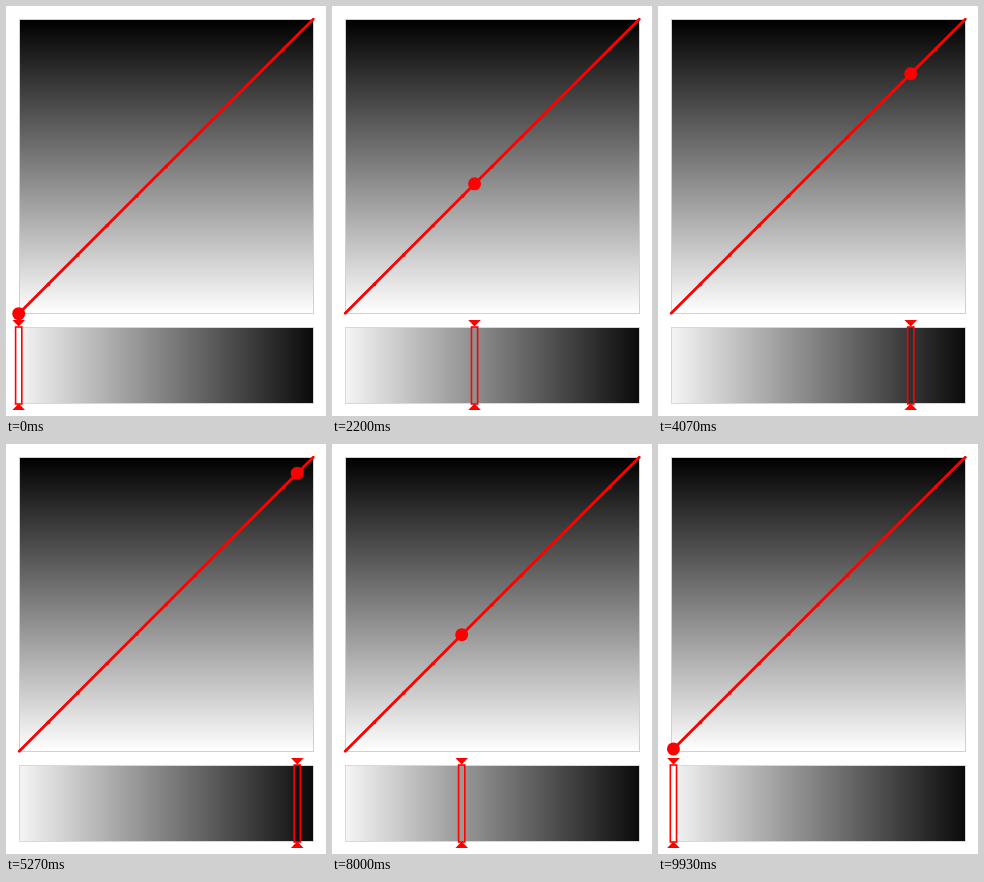
Recreate the animation shown at these times as an HTML page. Size 320x410 px, loop 9.99 s.

```html
<!DOCTYPE html>
<html lang="en">
<head>
<meta charset="utf-8">
<title>Linear grey scale</title>
<style>
  html, body { margin: 0; width: 100%; height: 100%; overflow: hidden; background: #fff; }
  svg { display: block; width: 320px; height: 410px; }
</style>
</head>
<body>
<svg viewBox="0 0 320 410">
  <defs>
    <linearGradient id="down" x1="0" y1="0" x2="0" y2="1">
      <stop offset="0" stop-color="#000"/>
      <stop offset="1" stop-color="#fff"/>
    </linearGradient>
    <linearGradient id="across">
      <stop offset="0" stop-color="#f5f5f5"/>
      <stop offset="1" stop-color="#0a0a0a"/>
    </linearGradient>
  </defs>
  <rect x="13.5" y="13.5" width="294" height="294" fill="url(#down)" stroke="#d0d0d0"/>
  <rect x="13.5" y="321.5" width="294" height="76" fill="url(#across)" stroke="#d8d8d8"/>
  <g id="curve" fill="#f00">
    <path d="M13.2 307.3L307.3 13.2" stroke="#f00" stroke-width="2.8" stroke-linecap="round"/>
  </g>
  <g id="marker" fill="#f00">
    <path d="M-6.3 314H6.3L0 320.5ZM-6.3 404H6.3L0 397.5Z"/>
    <rect id="slot" x="-3.1" y="321" width="6.2" height="77" stroke="#f00" stroke-width="1.6"/>
    <circle id="dot" r="6.5"/>
  </g>
</svg>
<script>
  const LOOP = 9990, HALF = 75, LEFT = 12.7, SPAN = 295;
  const byId = id => document.getElementById(id);
  const curve = byId('curve'), marker = byId('marker'), slot = byId('slot'), dot = byId('dot');

  // Slight knots along the line
  for (const k of [1, 2, 3, 4, 5, 6, 9]) {
    const knot = document.createElementNS('http://www.w3.org/2000/svg', 'circle');
    knot.setAttribute('cx', 13 + 29.4 * k);
    knot.setAttribute('cy', 307.8 - 29.4 * k);
    knot.setAttribute('r', 1.9);
    curve.append(knot);
  }

  // 15 steps a second, on a 10 ms clock
  const stepAt = t => Math.floor((Math.floor(t / 10) * 10 + 3.4) * 0.015);

  const posAt = n => n <= HALF ? LEFT + 3.935 * n : 307 - 3.94 * (n - HALF);

  function draw(t) {
    const x = posAt(stepAt(t % LOOP));
    const share = Math.min(1, Math.max(0, (x - LEFT) / SPAN));
    const grey = Math.round(255 * (1 - share));
    marker.setAttribute('transform', `translate(${x.toFixed(2)} 0)`);
    dot.setAttribute('cy', (320.4 - x).toFixed(2));
    slot.setAttribute('fill', `rgb(${grey},${grey},${grey})`);
  }

  let start = null;
  function tick(now) {
    if (start === null) start = now;
    draw(now - start);
    requestAnimationFrame(tick);
  }
  draw(0);
  requestAnimationFrame(tick);
</script>
</body>
</html>
```
